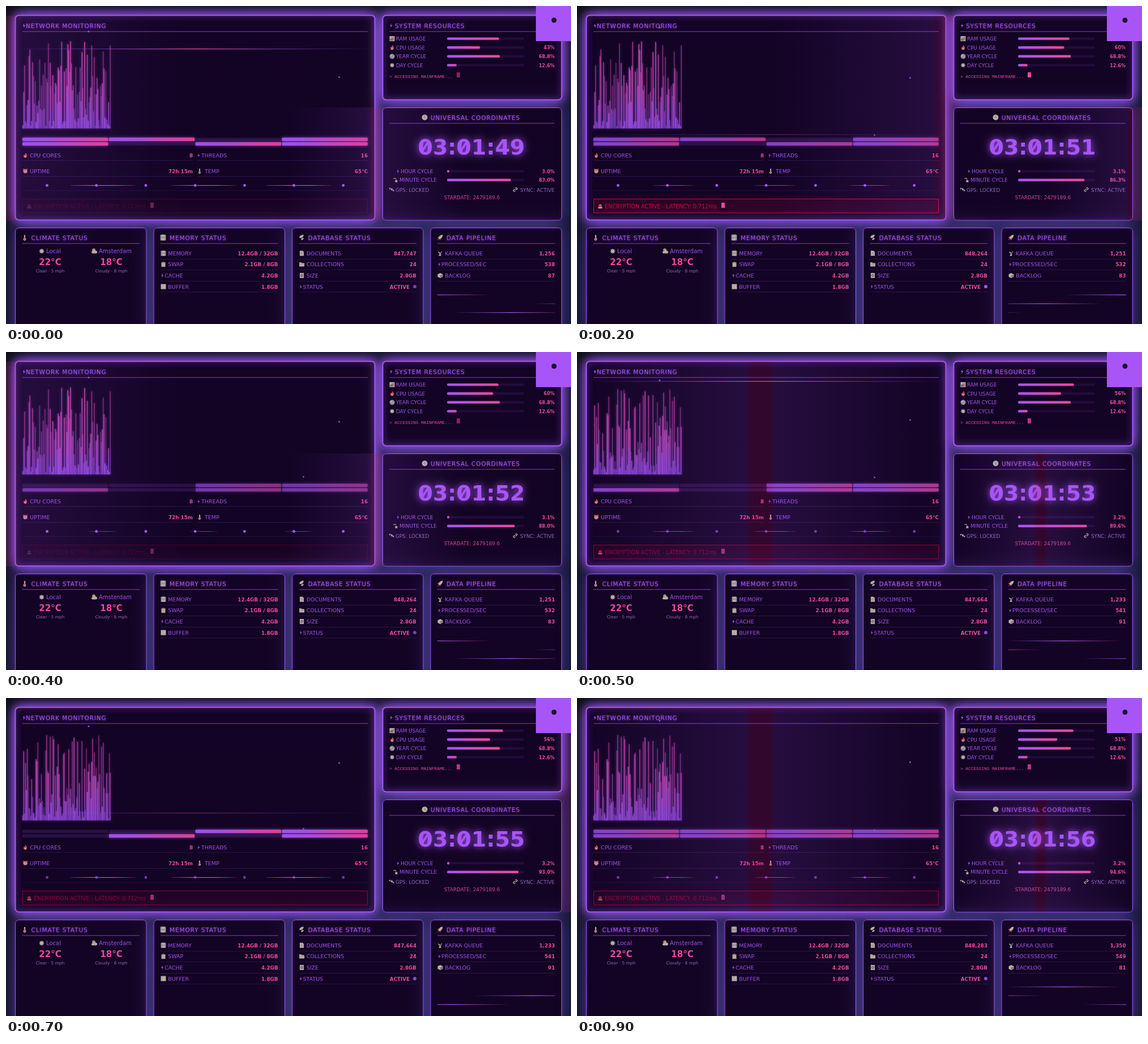
Recreate the animation shown at these times as an HTML page with a canvas. Size 998 px wide and 561 px high, loop 1000 ms.

```html
<!DOCTYPE html>
<html lang="en">
<head>
<meta charset="utf-8">
<title>Dashboard</title>
<style>
html, body { margin: 0; width: 100%; height: 100%; overflow: hidden; background: #0b0a12; }
canvas { display: block; }
</style>
</head>
<body>
<canvas id="stage" width="998" height="561"></canvas>
<script>
const ctx = document.getElementById('stage').getContext('2d');
const PURPLE = '#a855f7', PINK = '#ec4899', LABEL = '#a052ee', MUTED = '#9168bb', BEIGE = '#b8aca4', RED = '#d8043f';
const SANS = '"DejaVu Sans", sans-serif', MONO = '"Liberation Mono", monospace';
const violet = a => `rgba(168,85,247,${a})`;
const { sin, cos, floor, min, max, PI } = Math;

// Motion: n counts 100 ms steps
const pulse = n => .5 - .5 * cos(n * PI / 2);
const wrap = (v, size) => ((v % size) + size) % size;
const load = n => cos(n * .9);
const sweepAt = n => n % 4 * .52 - .035;
const second = n => floor(49.8 + n * .744);

const samples = [
  { ram: 92, cpu: 43, docs: '847,747', queue: '1,256', rate: '538', backlog: '87', cores: '11011011' },
  { ram: 91, cpu: 60, docs: '848,264', queue: '1,251', rate: '532', backlog: '83', cores: '00111011' },
  { ram: 99, cpu: 56, docs: '847,664', queue: '1,233', rate: '541', backlog: '91', cores: '00110101' },
  { ram: 98, cpu: 51, docs: '848,283', queue: '1,350', rate: '549', backlog: '81', cores: '11111111' }
];

// Small 10 x 10 icons: fill, path, fill, path ...
const icons = {
  bolt: [LABEL, 'M6 1 3 5.6h2L4 9.5 7.5 4.4H5.4z'],
  fire: ['#df4560', 'M5 0Q9 4 8.5 7A3.6 3.6 0 0 1 1.5 7Q2 4 3 3Q4 5 4.5 4Q5.3 2 5 0', BEIGE, 'M5 5Q7 7.5 6.5 9H3.5Q3 7 5 5'],
  chart: [BEIGE, 'M0 0h10v10H0z', '#55506a', 'M1.5 5h1.8v4H1.5zM4.2 3H6v6H4.2z', '#c0506a', 'M7 1.5h1.6V9H7z'],
  globe: ['#8e88a0', 'M5 0a5 5 0 1 0 .1 0z', BEIGE, 'M3 1 6 3 4 6 1 4zM6 5 9 4 7 9z'],
  dial: [BEIGE, 'M5 0a5 5 0 1 0 .1 0z', '#8c837f', 'M4.4 2h1v3.2h2v1h-3z'],
  sun: [BEIGE, 'M5 0 6 2.2 8.5 1.5 7.8 4 10 5 7.8 6 8.5 8.5 6 7.8 5 10 4 7.8 1.5 8.5 2.2 6 0 5 2.2 4 1.5 1.5 4 2.2z'],
  cloud: ['#b58c74', 'M4 0a3 3 0 1 0 .1 0z', BEIGE, 'M2 9a2 2 0 0 1 0-4 3 3 0 0 1 5-1A2.5 2.5 0 1 1 8 9z'],
  clock: ['#bd5060', 'M5 1a4.5 4.5 0 1 0 .1 0zM0 2 2 0 3 1 1 3zM10 2 8 0 7 1 9 3z', BEIGE, 'M5 2.4a3 3 0 1 0 .1 0z', '#4a3040', 'M4.6 3.5h.9v2.3H4.6z'],
  temp: [BEIGE, 'M3.8 1q1.2-1.6 2.4 0v5a2.3 2.3 0 1 1-2.4 0z', '#cf405c', 'M4.6 3h.8v3.5a1.3 1.3 0 1 1-.8 0z'],
  siren: ['#d8415a', 'M2 7V4a3 3 0 0 1 6 0v3z', BEIGE, 'M1 7h8v2.5H1z'],
  dizzy: [BEIGE, 'M6 4 7.2 5.7 9.5 6 7.8 7.5 8.2 10 6 8.8 3.8 10 4.2 7.5 2.5 6 4.8 5.7z', '#c88a80', 'M0 2Q4-1 6 3L5 4Q3 1 0 3z'],
  dish: [BEIGE, 'M1 1Q1 7 8 7zM3 7h3l1 3H2z', '#8e88a0', 'M5 4 8 1 9 2 6 5z'],
  probe: [BEIGE, 'M3.5 3.5 6 2 7.5 5 5 7z', '#8e88a0', 'M0 2 3 1 4 3 1 5zM7 5 10 5 10 8 7 8z'],
  link: [BEIGE, 'M0 7 3 4 5 5 4 6 3.2 5.8 1.8 7.2 3 8.4 5 6.6 5.6 7.8 3 10zM10 3 7 6 5 5 6 4 6.8 4.2 8.2 2.8 7 1.6 5 3.4 4.4 2.2 7 0z'],
  disk: ['#8f8798', 'M0 0h9l1 1v9H0z', BEIGE, 'M2 0h6v4H2zM2 6h6v4H2z'],
  clip: ['#b18a78', 'M1 1h8v9H1z', BEIGE, 'M2 2.5h6V9H2z', '#8f8798', 'M3.5 0h3v2.2h-3z'],
  block: [BEIGE, 'M0 0h10v10H0z'],
  leaf: [BEIGE, 'M1 5Q2 0 9 0 8 6 3 6zM4 9Q5 5 9 6 8 10 4 9z'],
  page: [BEIGE, 'M1 0h5.5L9 2.5V10H1z', '#8a8088', 'M2.5 4h5v.7h-5zM2.5 6h5v.7h-5z'],
  folder: [BEIGE, 'M0 1h4l1 1.5h5V9H0z', '#94888a', 'M0 4h10v.7H0z'],
  disc: [BEIGE, 'M1 0h8v10H1z', '#77707d', 'M5 2a3 3 0 1 0 .1 0z', BEIGE, 'M5 4a1 1 0 1 0 .1 0z'],
  rocket: [BEIGE, 'M10 0Q4 0 2 6L4 8Q10 6 10 0z', '#d0465e', 'M3 3 0 5 2 6zM7 7 5 10 4 8zM2 7 3 8 0 10z'],
  box: [BEIGE, 'M5 0 10 2.5V7.5L5 10 0 7.5V2.5z', '#83787a', 'M5 5 10 2.5V7.5L5 10z']
};

function icon(name, x, y, size = 9) {
  const parts = icons[name];
  ctx.save();
  ctx.translate(x - size / 2, y - size / 2);
  ctx.scale(size / 10, size / 10);
  for (let i = 0; i < parts.length; i += 2) {
    ctx.fillStyle = parts[i];
    ctx.fill(new Path2D(parts[i + 1]));
  }
  ctx.restore();
}

function text(str, x, y, size, color, align = 'left', weight = 400, spacing = 0, family = SANS) {
  ctx.font = `${weight} ${size}px ${family}`;
  ctx.letterSpacing = spacing + 'px';
  ctx.textAlign = align;
  ctx.fillStyle = color;
  ctx.fillText(str, x, y);
}
const value = (str, x, y, size = 8.8) => text(str, x, y, size, PINK, 'right', 700);

function rect(x, y, w, h, color) {
  ctx.fillStyle = color;
  ctx.fillRect(x, y, w, h);
}
function round(x, y, w, h, r, color) {
  ctx.beginPath();
  ctx.roundRect(x, y, w, h, r);
  ctx.fillStyle = color;
  ctx.fill();
}
function dot(x, y, r, color) {
  ctx.beginPath();
  ctx.arc(x, y, r, 0, 7);
  ctx.fillStyle = color;
  ctx.fill();
}
function across(x0, x1, ...colors) {
  const g = ctx.createLinearGradient(x0, 0, x1, 0);
  colors.forEach((c, i) => g.addColorStop(i / (colors.length - 1), c));
  return g;
}
function glow(color, blur, draw) {
  ctx.save();
  ctx.shadowColor = color;
  ctx.shadowBlur = blur;
  draw();
  ctx.restore();
}
function faded(alpha, draw) {
  ctx.save();
  ctx.globalAlpha = alpha;
  draw();
  ctx.restore();
}

function panel(x, y, w, h, bright) {
  const body = () => round(x, y, w, h, 6, '#130324');
  glow('rgba(110,90,225,.6)', 34, body);
  if (bright) glow(PURPLE, 22, body);
  glow(violet(bright ? 1 : .3), bright ? 12 : 5, () => {
    ctx.beginPath();
    ctx.roundRect(x + .5, y + .5, w - 1, h - 1, 6);
    ctx.strokeStyle = PURPLE;
    ctx.lineWidth = bright ? 2 : 1;
    ctx.stroke();
  });
}

function sweep(x, y, w, h, at) {
  const left = x + (at - .5) * w, g = ctx.createLinearGradient(left, 0, left + w, 0);
  const stops = { 0: violet(0), .45: violet(.12), .48: 'rgba(205,25,90,.17)' };
  for (const s in stops) {
    g.addColorStop(+s, stops[s]);
    g.addColorStop(1 - s, stops[s]);
  }
  rect(left, y, w, h, g);
}

function heading(str, iconName, iconX, textX, y, x0, x1) {
  icon(iconName, iconX, y - 4, 10);
  glow(violet(.6), 4, () => text(str, textX, y, 10.5, PURPLE, 'left', 400, .9));
  rect(x0, y + 6, x1 - x0, 1, violet(.75));
}

function meter(y, px) {
  round(779, y - 2.2, 136, 4.4, 2.2, '#220b3d');
  round(779, y - 2.2, px, 4.4, 2.2, across(779, 779 + px, PURPLE, PINK));
}

function row(iconName, label, val, x0, x1, y, textX = x0 + 13) {
  icon(iconName, x0 + (iconName === 'bolt' ? 3 : 5), y - 3.5);
  text(label, textX, y, 9.5, LABEL);
  value(val, x1, y);
}

function wave(seed) {
  const rand = () => (seed = seed * 16807 % 2147483647) / 2147483647;
  const fill = ctx.createLinearGradient(0, 60, 0, 216);
  fill.addColorStop(0, PINK);
  fill.addColorStop(.6, '#d04ab0');
  fill.addColorStop(1, '#9a50f5');
  glow(violet(.7), 4, () => {
    for (let x = 29; x < 184; x += 1.56) {
      const h = 4 + 150 * rand() ** 1.3;
      faded(.4 + .5 * rand(), () => rect(x, 216 - h, 1.5, h, fill));
    }
  });
}

function network(n, now) {
  panel(16, 16, 636, 362, true);
  heading('NETWORK MONITORING', 'bolt', 31.5, 35, 38.5, 29, 639);
  wave(n < 5 ? 3701 : 9113);

  const cores = samples[floor(n / 2.6)].cores;
  for (let i = 0; i < 8; i++) {
    const x = 29 + i % 4 * 152.8, y = i < 4 ? 232.3 : 240.2;
    round(x, y, 151.5, 6, 1.5, violet(.16));
    if (cores[i] === '1') faded(.72 + .28 * load(n), () => glow(violet(.7), 5, () =>
      round(x, y, 151.5, 6, 1.5, across(x, x + 151.5, '#9d50ed', '#a84dd5', '#c747ad', '#e2408c'))));
  }

  row('fire', 'CPU CORES', '8', 29, 330, 267);
  row('bolt', 'THREADS', '16', 337, 639, 267, 345);
  row('clock', 'UPTIME', '72h 15m', 29, 330, 294.5);
  row('temp', 'TEMP', '65°C', 337, 639, 294.5, 351);
  for (const y of [272, 300]) {
    rect(29, y, 301, 1, violet(.18));
    rect(337, y, 302, 1, violet(.18));
  }
  rect(29, 325, 610, 1, violet(.1));

  const reach = 40 + 17 * load(n);
  for (const mid of [171, 349.5, 517]) faded(.75 + .25 * load(n), () =>
    rect(mid - reach, 316, reach * 2, 1.1, across(mid - reach, mid + reach, violet(.3), PURPLE, PINK, 'rgba(236,72,153,.2)')));
  for (let i = 0; i < 7; i++) dot(72.5 + i * 87.2, 316.5, 2.4, violet(.82 + .18 * cos(n * PI)));

  const alert = .24 + .76 * pulse(n);
  faded(alert, () => {
    rect(29, 340, 610, 25, 'rgba(255,0,64,.1)');
    ctx.strokeStyle = RED;
    ctx.lineWidth = 1;
    ctx.strokeRect(29.5, 340.5, 609, 24.5);
    icon('siren', 41, 353);
    text('ENCRYPTION ACTIVE - LATENCY: 0.712ms', 49, 356.5, 9.6, RED);
  });
  faded(max(.4, alert), () => rect(255, 347, 6, 9, PINK));

  const scan = wrap(75 + n * 75.6, 402);
  faded(min(1, max(0, 1.35 - scan / 225)), () => rect(17, scan, 634, 1.3,
    across(17, 651, violet(0), violet(.45), PINK, violet(.45), violet(0))));
  sweep(16, 17, 636, 361, sweepAt(n));
}

function resources(n, now) {
  panel(665, 16, 317, 150, true);
  heading('SYSTEM RESOURCES', 'bolt', 680, 687, 38.5, 677, 969);
  const rows = [
    ['chart', 'RAM USAGE', '', now.ram],
    ['fire', 'CPU USAGE', now.cpu + '%', now.cpu * 1.36],
    ['globe', 'YEAR CYCLE', '68.8%', 93.5],
    ['sun', 'DAY CYCLE', '12.6%', 17]
  ];
  rows.forEach(([name, label, val, px], i) => {
    const y = 57.6 + i * 15.6;
    icon(name, 682, y);
    text(label, 689, y + 3.3, 8.8, LABEL);
    meter(y, px);
    value(val, 969, y + 3.2, 8);
  });
  text('> ACCESSING MAINFRAME...', 677, 126.5, 7.8, PINK, 'left', 400, 0, MONO);
  faded(.5 + .5 * pulse(n), () => rect(796, 117, 6, 9, PINK));
}

// Digits with a slash through each zero
function bigClock(str, mid, y) {
  text(str, mid, y, 38, PURPLE, 'center', 700);
  const left = mid - ctx.measureText(str).width / 2;
  ctx.strokeStyle = PURPLE;
  ctx.lineWidth = 3.5;
  [...str].forEach((c, i) => {
    if (c !== '0') return;
    const x = left + ctx.measureText(str.slice(0, i)).width;
    ctx.beginPath();
    ctx.moveTo(x + 8, y - 6);
    ctx.lineTo(x + 18.5, y - 22);
    ctx.stroke();
  });
}

function cycle(iconName, iconX, label, x, y, percent) {
  icon(iconName, iconX, y);
  text(label, x, y + 3.3, 9, LABEL);
  meter(y, percent * 1.36);
  value(percent.toFixed(1) + '%', 969, y + 3.3, 8);
}

function coordinates(n) {
  panel(665, 179, 317, 199.5);
  heading('UNIVERSAL COORDINATES', 'dial', 739.5, 750, 200.5, 677, 969);
  const s = second(n);
  glow(PURPLE, 14, () => bigClock('03:01:' + s, 822, 261.5));
  cycle('bolt', 692, 'HOUR CYCLE', 697, 291.5, (60.78 + s) / 36);
  cycle('dizzy', 688.5, 'MINUTE CYCLE', 695, 307, (s + .78) / .6);
  icon('probe', 681, 324);
  text('GPS: LOCKED', 688, 327.5, 8.8, MUTED);
  icon('link', 899.5, 324);
  text('SYNC: ACTIVE', 969, 327.5, 8.8, MUTED, 'right');
  text('STARDATE: 2479189.6', 823, 341, 8.8, '#d44596', 'center');
  sweep(665, 179, 317, 199.5, sweepAt(n));
}

function lowerPanel(x, title, iconName, rows) {
  panel(x, 391, 232.5, 190);
  heading(title, iconName, x + 17, x + 28.5, 412.5, x + 12.5, x + 220);
  rows.forEach(([name, label, val], i) => {
    const y = 439.7 + i * 19.6;
    row(name, label, val, x + 12.5, x + (label === 'STATUS' ? 208 : 220), y, x + (name === 'bolt' ? 19.5 : 25.7));
    rect(x + 12.5, Math.round(y + 5.8), 207.5, 1, violet(.18));
  });
}

function weather(iconName, iconX, place, textX, mid, temp, sky) {
  icon(iconName, iconX, 432.5, 10);
  text(place, textX, 436, 10, LABEL);
  text(temp, mid, 456.5, 15, PINK, 'center', 700);
  text(sky, mid, 470.3, 7.5, MUTED, 'center');
}

function flows(n) {
  ctx.save();
  ctx.beginPath();
  ctx.rect(762, 505, 208, 50);
  ctx.clip();
  for (let i = 0; i < 3; i++) {
    const x = 554 + wrap(98 + n * 104 - i * 140, 416);
    rect(x, 509 + i * 15.6, 208, 1.2, across(x, x + 208, violet(0), PURPLE, 'rgba(236,72,153,0)'));
  }
  ctx.restore();
}

function draw(n) {
  const now = samples[floor(n * .37 + .4)];
  const bg = ctx.createLinearGradient(0, 0, 300, 561);
  bg.addColorStop(0, '#0a0a10');
  bg.addColorStop(1, '#12112a');
  rect(0, 0, 998, 561, bg);

  network(n);
  resources(n, now);
  coordinates(n);

  lowerPanel(16, 'CLIMATE STATUS', 'temp', []);
  weather('sun', 63, 'Local', 71, 78, '22°C', 'Clear · 5 mph');
  weather('cloud', 156, 'Amsterdam', 164, 186, '18°C', 'Cloudy · 8 mph');
  lowerPanel(260.5, 'MEMORY STATUS', 'disk', [
    ['disk', 'MEMORY', '12.4GB / 32GB'], ['clip', 'SWAP', '2.1GB / 8GB'],
    ['bolt', 'CACHE', '4.2GB'], ['block', 'BUFFER', '1.8GB']]);
  lowerPanel(505, 'DATABASE STATUS', 'leaf', [
    ['page', 'DOCUMENTS', now.docs], ['folder', 'COLLECTIONS', '24'],
    ['disc', 'SIZE', '2.8GB'], ['bolt', 'STATUS', 'ACTIVE']]);
  dot(722, 495, 3, violet(.7 + .3 * pulse(n)));
  lowerPanel(749.5, 'DATA PIPELINE', 'rocket', [
    ['dish', 'KAFKA QUEUE', now.queue], ['bolt', 'PROCESSED/SEC', now.rate], ['box', 'BACKLOG', now.backlog]]);
  flows(n);

  dot(146, 45 - 7 * sin(n * PI / 4), 1.5, violet(.9));
  dot(588.5, 120 + 7 * cos((n - 1.5) * .45), 1.5, violet(.85));
  dot(525.5, 227 + 7 * cos(n * .75), 1.5, violet(.75));

  rect(936, 0, 62, 62, PURPLE);
  dot(968, 25, 4.5, '#1c0f2c');
}

let shown = -1;
function tick() {
  const n = floor(performance.now() / 100) % 10;
  if (n !== shown) draw(shown = n);
  requestAnimationFrame(tick);
}
tick();
</script>
</body>
</html>
```
